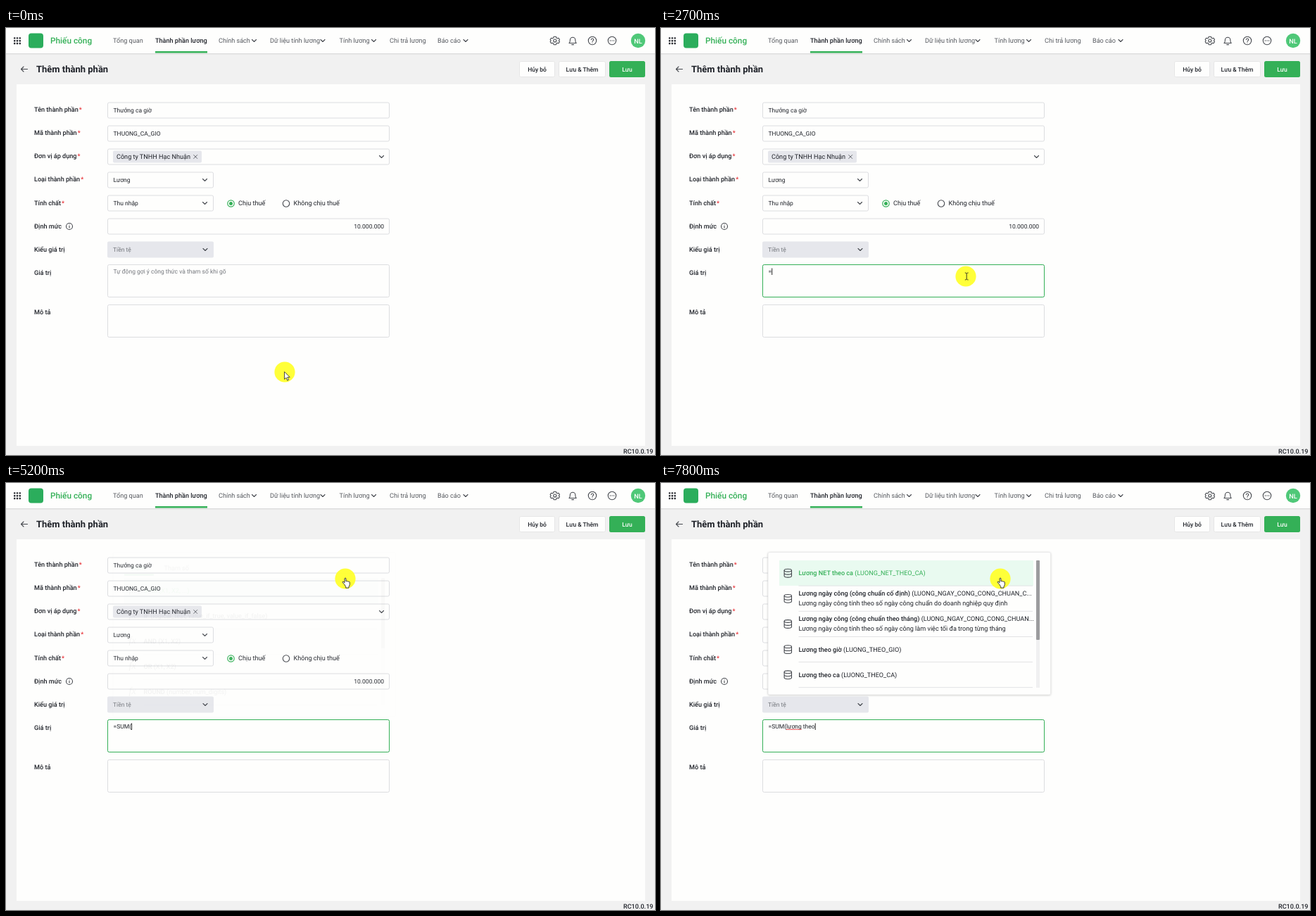
An HTML page for the animation above (8 s loop, 922x607 px).

```html
<!DOCTYPE html>
<html lang="vi">
<head>
<meta charset="utf-8">
<style>
html, body { margin: 0; width: 100%; height: 100%; overflow: hidden; background: #f1f1f1; }
svg { display: block; }
text { font: 9.1px Roboto, sans-serif; fill: #1f2229; white-space: pre; text-rendering: geometricPrecision; }
.s { font-size: 8.5px; }
.m, .b { font-weight: 500; }
.grey { fill: #55585e; }
.hint { fill: #74777d; }
.green { fill: #34b057; }
.white { fill: #fff; }
.title { font-size: 13px; font-weight: 700; }
.brand { font-size: 11.8px; font-weight: 500; }
.fx { font: italic 14px "Liberation Serif", serif; fill: #55585e; }
.mid { text-anchor: middle; }
.end { text-anchor: end; }
.line { fill: none; stroke: #45484e; stroke-width: 1.1; stroke-linecap: round; stroke-linejoin: round; }
</style>
</head>
<body>
<svg id="stage" width="922" height="607" viewBox="0 0 922 607"></svg>
<script>
const GREEN = '#34b057', PAPER = '#fefefd';

const text = (x, y, s, cls = '') => `<text x="${x}" y="${y}" class="${cls}">${s}</text>`;
const rect = (x, y, w, h, fill, r = 0, more = '') =>
  `<rect x="${x}" y="${y}" width="${w}" height="${h}" rx="${r}" fill="${fill}" ${more}/>`;
const circle = (x, y, r, more = 'class="line"') => `<circle cx="${x}" cy="${y}" r="${r}" ${more}/>`;
const path = (d, more = 'class="line"') => `<path d="${d}" ${more}/>`;
const chevron = (x, y) => path(`M${x - 3} ${y - 1.5}l3 3l3 -3`);
const field = (x, y, w, h) => rect(x, y, w, h, PAPER, 2, 'stroke="#dcdde0"');
const glow = (id, y) => rect(144.5, y, 400, 46, 'none', 2, `id="${id}" stroke="${GREEN}" opacity="0"`);

function header() {
  let s = rect(0, 0, 922, 36, PAPER) + rect(0, 36, 922, 1, '#dcdcdc') + rect(0, 37, 922, 1, '#e9e9e9');
  for (let i = 0; i < 9; i++) s += rect(11 + i % 3 * 3.8, 13.2 + (i / 3 | 0) * 3.8, 2.4, 2.4, '#2b2d33', .6);
  s += rect(32, 7.5, 21, 21, '#2bad5c', 4) + text(63, 22, 'Phiếu công', 'brand green');
  s += text(152, 21, 'Tổng quan', 'grey') + text(212, 21, 'Thành phần lương', 'm') + rect(212, 33, 74, 2.5, GREEN);
  for (const [x, label, arrow] of [[302, 'Chính sách', 352.5], [375, 'Dữ liệu tính lương', 450],
    [473.5, 'Tính lương', 522.5], [545, 'Chi trả lương', 0], [613, 'Báo cáo', 653]])
    s += text(x, 21.3, label, 'grey') + (arrow ? chevron(arrow, 18) : '');
  s += path('M778.3 12.2h3l.6 1.7l1.4.8l1.8-.4l1.4 2.4l-1.2 1.3l1.2 1.3l-1.4 2.4l-1.8-.4l-1.4.8l-.6 1.7h-3l-.6-1.7l-1.4-.8l-1.8.4l-1.4-2.4l1.2-1.3l-1.2-1.3l1.4-2.4l1.8.4l1.4-.8z')
    + circle(779.8, 18, 2);
  s += path('M800 21.5c1.3-1 1.4-2.4 1.4-4.6a3.7 3.7 0 0 1 7.4 0c0 2.2.1 3.6 1.4 4.6zM803.7 23.6h2.8');
  s += circle(833, 18, 5.7) + path('M831.3 16.6a1.7 1.7 0 1 1 2.4 1.6q-.7.4-.7 1.1M833 21v.1');
  s += circle(861, 18, 5.7);
  for (const x of [858.4, 861, 863.6]) s += circle(x, 18, .75, 'fill="#45484e"');
  return s + circle(898, 18, 10.2, 'fill="#4fc878"') + text(898, 21.7, 'NL', 'm white mid');
}

function toolbar() {
  return path('M30.5 58.5h-9M25 55l-3.5 3.5l3.5 3.5') + text(43, 63, 'Thêm thành phần', 'title')
    + rect(729.5, 47.5, 50, 22, PAPER, 2, 'stroke="#e6e6e6"') + text(754.5, 61.7, 'Hủy bỏ', 's m mid')
    + rect(785.5, 47.5, 66, 22, PAPER, 2, 'stroke="#e6e6e6"') + text(818.5, 61.7, 'Lưu &amp; Thêm', 's m mid')
    + rect(857, 47, 51, 23, GREEN, 2.5) + text(882.5, 61.7, 'Lưu', 's m mid white');
}

function form() {
  let s = rect(15, 80, 893, 514, PAPER);
  const labels = ['Tên thành phần*', 'Mã thành phần*', 'Đơn vị áp dụng*', 'Loại thành phần*', 'Tính chất*',
    'Định mức', 'Kiểu giá trị', 'Giá trị', 'Mô tả'];
  labels.forEach((label, i) => {
    const y = i < 8 ? 119.3 + i * 33.05 : 407.2;
    s += text(40, y, label.replace('*', '<tspan fill="#e8383d" dx="1">*</tspan>'), 'm');
  });
  for (let i = 0; i < 6; i++) s += field(144.5, 106 + i * 33, i === 3 || i === 4 ? 150 : 400, 22);
  s += text(152.5, 120, 'Thưởng ca giờ', 's') + text(152.5, 153, 'THUONG_CA_GIO', 's');
  s += rect(152, 174.5, 126, 17, '#e6e7ec', 2) + text(157, 186.2, 'Công ty TNHH Hạc Nhuận')
    + path('M266.7 180.5l5 5m0 -5l-5 5', 'class="line" style="stroke-width:.8"') + chevron(533.5, 183);
  s += text(152.5, 219, 'Lương', 's') + chevron(282.5, 216);
  s += text(152.5, 252, 'Thu nhập', 's') + chevron(282.5, 249);
  s += circle(319.5, 249.5, 4.7, `fill="none" stroke="${GREEN}" stroke-width="1.2"`) + circle(319.5, 249.5, 2.5, `fill="${GREEN}"`)
    + text(330, 252.3, 'Chịu thuế') + circle(398, 249.5, 4.7) + text(408.5, 252.3, 'Không chịu thuế');
  s += circle(90, 282, 4.5) + path('M90 281.6v2.4M90 279.7v.1') + text(537, 285.2, '10.000.000', 's end');
  s += rect(144, 303.5, 151, 23, '#e6e7ec', 2) + text(152, 318.2, 'Tiền tệ', 's hint') + chevron(283, 315);
  s += field(144.5, 336.5, 400, 46) + field(144.5, 393.5, 400, 46) + glow('valueGlow', 336.5) + glow('noteGlow', 393.5);
  s += `<text id="typed" x="152.5" y="349.2" class="s"></text>`
    + rect(0, 341.5, .9, 9.5, '#111', 0, 'id="caret"')
    + path('M178 350.4h21.5', 'id="spell" stroke="#e8383d" stroke-width="1.2" stroke-dasharray="1.5 .6"');
  return s;
}

const panel = (id, h, body) => `<g id="${id}"><g filter="url(#shadow)">${rect(152, 98.5, 401.5, h, PAPER, 2)}</g>`
  + rect(152, 98.5, 401.5, h, 'none', 2, 'stroke="#e4e4e6" stroke-width=".7"') + body + '</g>';
const rule = (y, x2) => rect(195.5, y, x2 - 195.5, .8, '#dcdde0');
const label = (y, name, args, hot) => text(195.5, y, `<tspan class="b">${name}</tspan> ${args}`, hot ? 'green' : '');
const highlight = (y, id) => rect(168, y, 361, 36, '#e9faf0', 0, id ? `id="${id}"` : '');
const scrollbar = (y, track, thumb) => rect(533, y, 5, track, '#f0f0f1') + rect(533, y, 5, thumb, '#9c9c9e', 1);

function functionPanel() {
  let s = text(178, 124.2, 'Hàm', 'm green') + rect(168, 129.5, 42, 2, GREEN) + text(224.5, 124.2, 'Tham số', 'grey') + highlight(135);
  [['SUM', '(X1, X2, ...)'], ['IF', '(logical_test, value_if_true, value_if_false)'], ['AND', '(X1, X2)'],
    ['OR', '(X1, X2)'], ['ROUND', '(number, num_digits)']].forEach(([name, args], i) => {
    const y = 156.2 + i * 36;
    s += text(174.5, y, 'fx', 'fx') + label(y, name, args, !i) + rule(y + 15, 528);
  });
  return panel('functions', 233, s + scrollbar(135, 181, 100));
}

function sumPanel() {
  return panel('sum', 202.5, `<rect id="sumHover" x="168" y="110" width="370" height="36" fill="#e9faf0"/>`
    + text(174.5, 131.5, 'fx', 'fx') + `<g id="sumText">${label(131, 'SUM', '(X1, X2, ...)')}</g>` + rule(145.5, 533));
}

const database = y => `<ellipse cx="180.3" cy="${y - 4}" rx="5.2" ry="1.9" class="line"/>`
  + path(`M175.1 ${y - 4}v8c0 2.5 10.4 2.5 10.4 0v-8M175.1 ${y}c0 2.5 10.4 2.5 10.4 0`);

function resultPanel() {
  let s = highlight(110);
  [['Lương NET theo ca', '(LUONG_NET_THEO_CA)'],
    ['Lương ngày công (công chuẩn cố định)', '(LUONG_NGAY_CONG_CONG_CHUAN_C...', 'Lương ngày công tính theo số ngày công chuẩn do doanh nghiệp quy định'],
    ['Lương ngày công (công chuẩn theo tháng)', '(LUONG_NGAY_CONG_CONG_CHUAN...', 'Lương ngày công tính theo số ngày công làm việc tối đa trong từng tháng'],
    ['Lương theo giờ', '(LUONG_THEO_GIO)'], ['Lương theo ca', '(LUONG_THEO_CA)']].forEach(([name, args, note], i) => {
    const y = 128.2 + i * 36.15;
    s += database(y) + label(y + (note ? -4.2 : 3), name, args, !i) + rule(y + 17.5, 528);
    if (note) s += text(195.5, y + 9.2, note);
  });
  return panel('results', 202.5, `<g id="resultList">${s + scrollbar(110, 181, 113)}</g>`);
}

const pointer = `<g id="pointer">${circle(0, 0, 14.6, 'fill="#ffff2e" opacity=".95"')}
  <g id="arrow">${path('M-.5 -.3v10.6l2.5-2.3l1.7 4l1.8-.8l-1.7-3.8h3.4z', 'fill="#fff" stroke="#222" stroke-width=".8"')}</g>
  <g id="beam">${path('M-1.2-5q1.8 0 2.4 1q.6-1 2.4-1M1.2-4v8M-1.2 5q1.8 0 2.4-1q.6 1 2.4 1', 'fill="none" stroke="#222" stroke-width=".9"')}</g>
  <g id="hand">${path('M-1 8.5L-3.6 5.6q-.8-1.5.7-1.5l2 1.6V-.3q.9-1.6 1.9 0v4q1-.9 1.8.2q1.100-.7 1.800.4q1.400-.5 1.700.8v3.700L5 11.500v1.600H.7v-1.600z', 'fill="#fff" stroke="#222" stroke-width=".9" stroke-linejoin="round"')}</g></g>`;

document.getElementById('stage').innerHTML =
  `<defs><filter id="shadow" x="-5%" y="-5%" width="110%" height="112%"><feDropShadow dx="0" dy=".6" stdDeviation="1.6" flood-opacity=".24"/></filter></defs>`
  + rect(0, 0, 922, 607, '#f1f1f1') + header() + toolbar() + form()
  + text(919.5, 605, 'RC10.0.19', 'm end')
  + functionPanel() + sumPanel() + resultPanel()
  + rect(32.3, 332.2, 519.5, 55.5, 'none', 0, 'id="callout" stroke="#f5121d" stroke-width="1.9"') + pointer;

const el = {};
document.querySelectorAll('[id]').forEach(e => el[e.id] = e);
const show = (id, on) => el[id].style.display = on ? '' : 'none';
const ramp = (t, a, b) => Math.min(1, Math.max(0, (t - a) / (b - a)));
const mix = (a, b, p) => a + (b - a) * p;

const HINT = 'Tự động gợi ý công thức và tham số khi gõ';
const typing = [[0, ''], [2700, '='], [3730, '=s'], [3800, '=su'], [4000, '=sum'], [5200, '=SUM('],
  [5960, '=SUM(l'], [6030, '=SUM(lu'], [6130, '=SUM(luo'], [6200, '=SUM(lươ'], [6300, '=SUM(lươn'], [6500, '=SUM(lương'],
  [7530, '=SUM(lương '], [7600, '=SUM(lương t'], [7660, '=SUM(lương th'], [7730, '=SUM(lương the'], [7800, '=SUM(lương theo']];

function draw(t) {
  const value = typing.filter(([at]) => at <= t).pop()[1];
  const content = value || HINT;
  if (el.typed.textContent !== content) el.typed.textContent = content;
  el.typed.setAttribute('class', value ? 's' : 's hint');
  el.caret.setAttribute('x', 152.6 + (value ? el.typed.getComputedTextLength() : 0));
  show('caret', t >= 2700 || t >= 1600 && t < 2130);
  show('spell', t >= 7300);

  el.callout.style.opacity = t < 2130 ? ramp(t, 30, 800) : 0;
  el.noteGlow.style.opacity = ramp(t, 1110, 1200) * (1 - ramp(t, 1310, 1430));
  el.valueGlow.style.opacity = ramp(t, 1310, 1430);

  // The pointer crosses the text areas, then climbs to the suggestion.
  const first = 1 - (1 - ramp(t, 1040, 1420)) ** 3;
  const p = ramp(t, 4610, 5060), second = p * p * (3 - 2 * p);
  const x = mix(mix(396, 433, first), 482, second);
  const y = mix(mix(489, 353, first), 136, second);
  const hand = y < 146, beam = y < 439 && y > 336;
  el.pointer.setAttribute('transform', `translate(${x} ${y})`);
  show('hand', hand);
  show('beam', beam);
  show('arrow', !hand && !beam);

  show('functions', t >= 2860 && t < 4360 || t >= 5200 && t < 6660);
  el.functions.style.opacity = t < 4360 ? ramp(t, 2845, 3260) : ramp(t, 5185, 5530);
  show('sum', t >= 4360 && t < 5200);
  show('sumHover', hand);
  el.sumText.firstChild.setAttribute('class', hand ? 'green' : '');
  show('results', t >= 6660);
  show('resultList', t < 6900 || t >= 7060);
}

const start = performance.now();
function tick() {
  draw((performance.now() - start) % 8000);
  requestAnimationFrame(tick);
}
tick();
</script>
</body>
</html>
```
